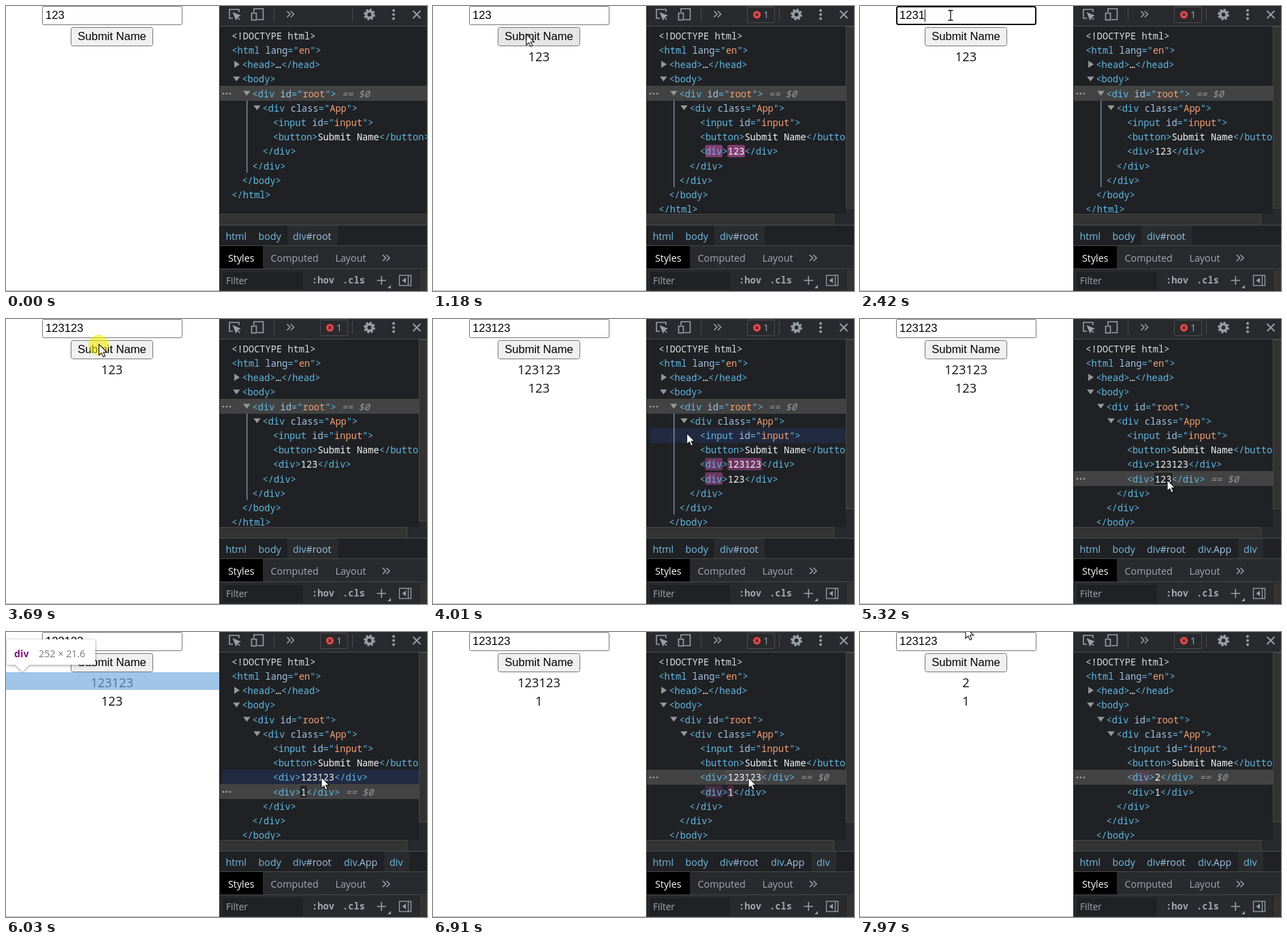
Animation of 618 by 418 pixels, one loop 8000 ms. Source, as an HTML page:

```html
<!DOCTYPE html>
<html lang="en">
<head>
<meta charset="utf-8">
<title>Keyless list demo</title>
<style>
html, body { margin: 0; width: 100%; height: 100%; overflow: hidden; background: #fff; }
svg { display: block; width: 618px; height: 418px; }
text { white-space: pre; }
.mono { font: 13.7px "Noto Sans Mono", monospace; }
.ui { font: 14.3px "Open Sans", sans-serif; fill: #a3a8ae; }
.ui.active { fill: #fff; }
.ui.hint { font-size: 13.6px; }
.bold { font-weight: bold; fill: #a3a8ae; }
.form { font: 16.6px "Liberation Sans", sans-serif; }
.out { font: 18.3px "Open Sans", sans-serif; fill: #111; text-anchor: middle; }
.icon { fill: none; stroke: #9aa0a6; stroke-width: 1.6; }
</style>
</head>
<body>
<svg viewBox="0 0 618 418">
  <defs>
    <clipPath id="treeClip"><rect x="313" y="30" width="305" height="275"/></clipPath>
    <filter id="soft" x="-20%" y="-30%" width="140%" height="170%">
      <feDropShadow dx="0" dy="1" stdDeviation="2.2" flood-opacity=".4"/>
    </filter>
  </defs>
  <rect width="618" height="418" fill="#fff"/>
  <rect y="417" width="313" height="1" fill="#bdbdbd"/>
  <g id="page"></g>
  <rect x="313" width="305" height="418" fill="#202124"/>
  <g id="tree" clip-path="url(#treeClip)"></g>

  <rect x="313" width="305" height="29" fill="#292a2d"/>
  <path d="M313 29.5H618M393.5 3v19M508.5 3v19" stroke="#494c50"/>
  <g class="icon">
    <path d="M342 9V5H328V18H333"/>
    <path d="M334 10.500L343 14L339.500 15.800L337.800 19.500Z" fill="#9aa0a6"/>
    <path d="M338.500 15L343 20"/>
    <path d="M364 9V4H377.500V20H369"/>
    <rect x="360.500" y="10.500" width="7" height="10"/>
    <path d="M412.500 7.500L417 12L412.500 16.500M418 7.500L422.500 12L418 16.500"/>
    <circle cx="533.500" cy="12.500" r="4.700" stroke-width="3.600"/>
    <circle cx="533.500" cy="12.500" r="7.200" stroke-width="2.600" stroke-dasharray="3.250 2.405"/>
    <path d="M597.500 7L608.500 18M608.500 7L597.500 18" stroke-width="1.900"/>
  </g>
  <g fill="#9aa0a6"><circle cx="569" cy="6.500" r="2"/><circle cx="569" cy="12.500" r="2"/><circle cx="569" cy="18.500" r="2"/></g>
  <g id="bars"></g>

  <rect x="313" y="322" width="305" height="29" fill="#202124"/>
  <path d="M313 321.500H618" stroke="#494c50"/>
  <g id="crumbs"></g>
  <rect x="313" y="351" width="305" height="67" fill="#292a2d"/>
  <path d="M313 351.500H618M313 385.500H618" stroke="#45474b"/>
  <rect x="314" y="352" width="63" height="33" fill="#000"/>
  <rect x="318" y="390" width="118" height="26" fill="#202124"/>
  <text x="326" y="375" class="ui active">Styles</text>
  <text x="388.500" y="375" class="ui">Computed</text>
  <text x="483.500" y="375" class="ui">Layout</text>
  <text x="323" y="408" class="ui hint">Filter</text>
  <text x="449" y="407" class="mono bold">:hov</text>
  <text x="494" y="407" class="mono bold">.cls</text>
  <g class="icon">
    <path d="M553 365L557.500 369.500L553 374M558.500 365L563 369.500L558.500 374"/>
    <path d="M544.500 402.500H558M551.250 396V409"/>
    <rect x="577.500" y="395" width="17" height="15" stroke-width="1.300"/>
    <path d="M590.500 395V410" stroke-width="1.300"/>
  </g>
  <path d="M565 409V414H560ZM587 398.500V406.500L581.500 402.500Z" fill="#9aa0a6"/>
  <rect x="606.500" y="386.500" width="12" height="32" fill="#333" stroke="#202124"/>
  <g id="pointer"></g>
</svg>
<script>
const LOOP = 8000, ROW = 21.18, TOP = 32.7, CH = 8.22;
const TAG = '#5fb8e4', ATTR = '#a2c4e6', VAL = '#f5a073', TXT = '#f4f5f7', DIM = '#95989c';

// moments of the session
const CLICK1 = 1050, FOCUS = 1740, BLUR = 3690, CLICK2 = 3760, PICK2 = 4980,
      EDIT2 = 5320, TYPE2 = 5490, PICK1 = 6330, EDIT1 = 6880, TYPE1 = 7120, SAVE1 = 7250;
const presses = [[930, CLICK1], [1700, 1800], [BLUR, CLICK2], [4900, PICK2],
                 [5200, 5260], [6300, 6380], [6780, 6850]];
const keys = [2390, 2630, 2770];
const path = [[110, 514, 420], [620, 137, 41], [1250, 137, 41], [1600, 133, 13], [2770, 133, 13],
  [3010, 136.5, 37], [3790, 136.5, 37], [4150, 490, 232.5], [4470, 490, 232.5], [4800, 451, 236],
  [5910, 451, 236], [6030, 463, 213], [7300, 463, 213], [7890, 157, 32], [7960, 155, -7]];

const $ = id => document.getElementById(id);
const within = (t, a, b) => t >= a && t < b;
const rect = (x, y, w, h, fill, more = '') =>
  `<rect x="${x}" y="${y}" width="${w}" height="${h}" fill="${fill}" ${more}/>`;
const text = (x, y, s, cls, more = '') => `<text x="${x}" y="${y}" class="${cls}" ${more}>${s}</text>`;
const esc = s => s.replace(/</g, '&lt;').replace(/>/g, '&gt;');
const span = (s, fill) => `<tspan fill="${fill}">${esc(s)}</tspan>`;

function cursorAt(t) {
  let i = path.findIndex(p => p[0] > t);
  if (i < 0) i = path.length;
  const a = path[Math.max(i - 1, 0)], b = path[Math.min(i, path.length - 1)];
  const u = b[0] > a[0] ? Math.max(0, (t - a[0]) / (b[0] - a[0])) : 0;
  const e = u * u * (3 - 2 * u);
  return { x: a[1] + (b[1] - a[1]) * e, y: a[2] + (b[2] - a[2]) * e };
}

// purple flash on changed nodes, fading out over 1.4 s
function flash(t, start) {
  const u = (t - start) / 1400;
  return u < 0 || u > 1 ? 0 : 0.9 * Math.pow(1 - u, 2.3);
}

const attr = (tag, name, value) => span('<' + tag, TAG) + span(' ' + name, ATTR) +
  span('="', TAG) + span(value, VAL) + span('">', TAG);

function listItems(t) {
  const second = {
    node: t < TYPE2 ? '123' : '1', shown: t < PICK1 ? '123' : '1',
    edit: within(t, EDIT2, PICK1), box: '#27282a', picked: within(t, PICK2, PICK1),
    glow: Math.max(flash(t, CLICK1), flash(t, CLICK2), flash(t, PICK1)),
    textGlow: Math.max(flash(t, CLICK1), flash(t, PICK1))
  };
  const first = {
    node: t < TYPE1 ? '123123' : '2', shown: t < SAVE1 ? '123123' : '2',
    edit: within(t, EDIT1, SAVE1), box: '#4a494b', picked: t >= PICK1,
    glow: Math.max(flash(t, CLICK2), flash(t, SAVE1)),
    textGlow: flash(t, CLICK2)
  };
  return t < CLICK1 ? [] : t < CLICK2 ? [second] : [first, second];
}

function treeRows(items, t) {
  const close = (tag, depth) => ({ depth, html: span(`</${tag}>`, TAG) });
  return [
    { depth: 0, html: span('<!DOCTYPE html>', '#dcdcdc') },
    { depth: 0, html: attr('html', 'lang', 'en') },
    { depth: 1, fold: 'closed', html: span('<head>', TAG) + span('…', TXT) + span('</head>', TAG) },
    { depth: 1, fold: 'open', html: span('<body>', TAG) },
    { depth: 2, fold: 'open', html: attr('div', 'id', 'root'), picked: t < PICK2 },
    { depth: 3, fold: 'open', html: attr('div', 'class', 'App') },
    { depth: 4, html: attr('input', 'id', 'input') },
    { depth: 4, html: span('<button>', TAG) + span('Submit Name', TXT) + span('</button>', TAG) },
    ...items.map(item => ({ depth: 4, item, picked: item.picked,
      html: span('<div>', TAG) + span(item.node, TXT) + span('</div>', TAG) })),
    close('div', 3), close('div', 2), close('body', 1), close('html', 0)
  ];
}

function drawTree(rows, hover, items, right) {
  let s = '';
  rows.forEach((r, i) => {
    const y = TOP + i * ROW, mid = y + ROW / 2 + .6, x = 331.3 + r.depth * 15.1;
    if (r.picked) {
      s += rect(314, Math.round(y), right - 314, 22, '#434343');
      for (let k = 0; k < 3; k++) s += `<circle cx="${319 + k * 5}" cy="${mid}" r="1.4" fill="#9a9a9a"/>`;
    } else if (i === hover) s += rect(318, Math.round(y), right - 318, 22, '#212a40');
    if (r.item) {
      const { glow, textGlow, edit, box, node } = r.item, w = node.length * CH;
      const mark = (col, len, o) => rect(x + col * CH - .5, y + 1.7, len * CH + 1, 18, '#a84a94', `rx="2" opacity="${o}"`);
      s += mark(1, 3, glow);
      if (edit) s += rect(x + 5 * CH - 2, y + 1.3, w + 4, 19, box, 'stroke="#5b5b5b" stroke-width=".8"');
      else s += mark(5, node.length, textGlow);
    }
    if (r.fold === 'open') s += `<path d="M${x - 13.3} ${mid - 4}h10.500l-5.250 7z" fill="${DIM}"/>`;
    if (r.fold === 'closed') s += `<path d="M${x - 11.3} ${mid - 6}v10.500l8-5.250z" fill="${DIM}"/>`;
    const mark = r.picked ? `<tspan fill="${DIM}" font-style="italic"> == $0</tspan>` : '';
    s += text(x, mid + 5, r.html + mark, 'mono');
  });
  if (rows[4].picked) s += rect(353, TOP + 5 * ROW, 1.5, (5 + items.length) * ROW, '#7389a0');
  $('tree').innerHTML = s;
}

function drawBars(count) {
  let s = rect(314, 305, 304, 16, '#28292c');
  const thumb = (x, y, w, h) => rect(x + .5, y + .5, w - 1, h - 1, '#333', 'stroke="#484848"');
  s += thumb(314, 305, count ? 275 : 305, 17);
  if (count) {
    s += rect(606, 30, 12, 275, '#28292c') + thumb(606, 30, 13, count > 1 ? 249 : 267);
    s += rect(461.5, 1.500, 40, 23, 'none', 'stroke="#4a4c50" rx="1.500"');
    s += '<circle cx="475.500" cy="12.800" r="5.600" fill="#e8464a"/>' +
      '<path d="M473.500 10.800l4 4m0-4l-4 4" stroke="#292a2d" stroke-width="1.300"/>';
    s += text(485, 18, '1', 'ui');
  }
  $('bars').innerHTML = s;
}

function drawCrumbs(t) {
  const deep = t >= PICK2;
  let s = deep ? rect(555, 322, 37, 29, '#292b2e') : rect(413, 322, 74, 29, '#292b2e');
  const crumb = (x, tag, rest = '') => text(x, 343, span(tag, '#72bde4') + span(rest, ATTR), 'ui');
  s += crumb(322.5, 'html') + crumb(370.5, 'body') + crumb(421, 'div', '#root');
  if (deep) s += crumb(496, 'div', '.App') + crumb(563, 'div');
  $('crumbs').innerHTML = s;
}

function overlay(n) {
  const y = 86 + (n - 1) * 27, top = y - 48;
  return rect(0, y, 313, 26, '#6fa8dc', 'opacity=".66"') +
    `<path d="M4 ${top}H128q3 0 3 3v31q0 3-3 3H34l-10 10l-10-10H4q-3 0-3-3v-31q0-3 3-3z" fill="#fff" filter="url(#soft)"/>` +
    text(12, top + 26, 'div', 'ui', 'style="fill:#881280;font-weight:bold"') +
    text(48, top + 26, '252 × 21.6', 'ui', 'style="fill:#777"');
}

function drawPage(t, items, pos, hovered) {
  const focus = within(t, FOCUS, BLUR);
  const typed = 3 + keys.filter(k => t >= k).length;
  let s = focus
    ? rect(54, 1, 204, 26, '#fff', 'stroke="#101010" stroke-width="2" rx="2.500"')
    : rect(53.5, .5, 205, 27, '#fff', 'stroke="#767676" rx="2"');
  s += text(58, 19, '123123'.slice(0, typed), 'form');
  if (focus && t < 3370) s += rect(58 + typed * 9.22, 5, 1, 18, '#000');
  const over = within(pos.x, 95, 216) && within(pos.y, 31, 59);
  const down = over && presses.some(p => within(t, ...p));
  s += rect(95.5, 31.5, 120, 27, over && !down ? '#e6e6e6' : '#f0f0f0', 'stroke="#767676" rx="3"');
  s += text(155.5, 50, 'Submit Name', 'form', 'text-anchor="middle"');
  items.forEach((item, i) => { s += text(155.5, 81 + i * 27, item.shown, 'out'); });
  const live = within(t, 3900, EDIT2) || within(t, 5910, EDIT1);
  if (live && hovered >= 0 && hovered < items.length) s += overlay(hovered);
  $('page').innerHTML = s;
}

function drawPointer(t, { x, y }) {
  let s = '';
  if (presses.some(p => within(t, ...p))) s += `<circle cx="-.500" cy="1" r="15" fill="#f2ea00" opacity=".58"/>`;
  if (within(x, 53, 259) && within(y, 0, 28)) {
    const bar = 'M-3.500 -6.500H-1L0 -5.500L1 -6.500H3.500M0 -5.500V7M-3.500 8H-1L0 7L1 8H3.500';
    s += `<path d="${bar}" fill="none" stroke="#111" stroke-width="1.300"/>`;
  } else {
    s += '<path d="M0 0V16.200L3.800 12.800L6.300 18.600L9 17.400L6.500 11.800H11.600Z" fill="#fff" stroke="#111" stroke-width="1.100"/>';
  }
  $('pointer').setAttribute('transform', `translate(${x} ${y})`);
  $('pointer').innerHTML = s;
}

function draw(t) {
  const pos = cursorAt(t), items = listItems(t), rows = treeRows(items, t);
  const right = items.length ? 606 : 618;
  const inTree = within(pos.x, 318, right) && within(pos.y, TOP, 305);
  const hover = inTree ? Math.floor((pos.y - TOP) / ROW) : -1;
  drawPage(t, items, pos, hover - 8);
  drawTree(rows, hover, items, right);
  drawBars(items.length);
  drawCrumbs(t);
  drawPointer(t, pos);
}

function tick() {
  draw(performance.now() % LOOP);
  requestAnimationFrame(tick);
}
tick();
</script>
</body>
</html>
```
